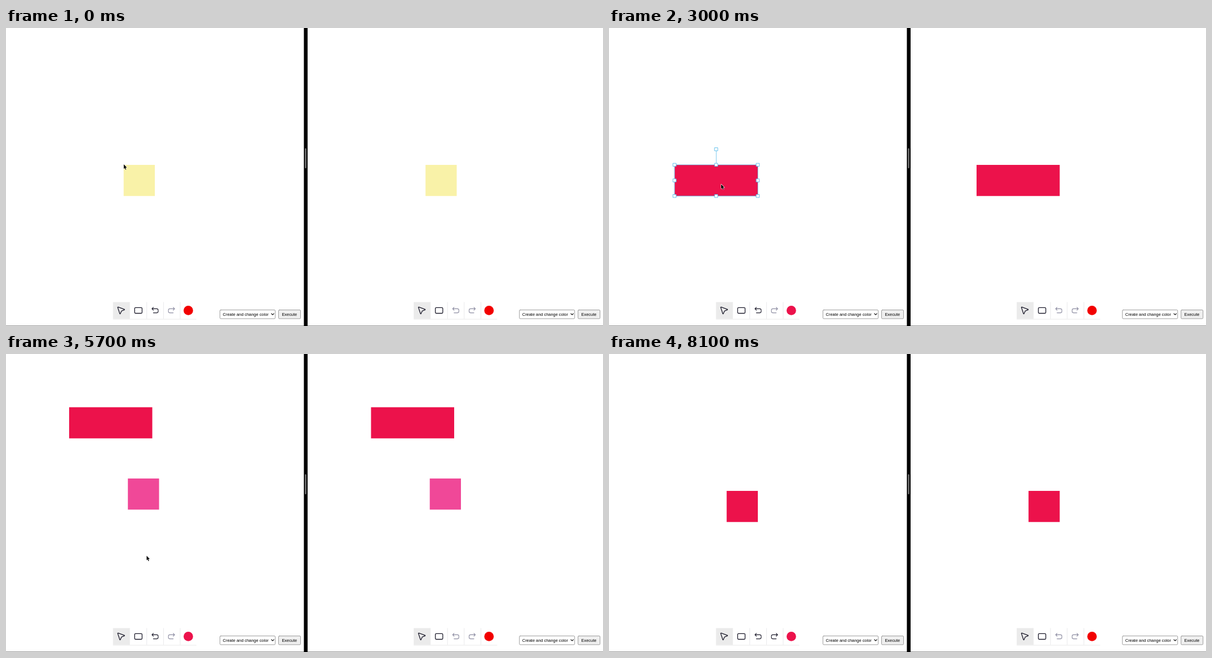
Animation of 1059x529 px, one loop 8200 ms. Source, as an HTML page with a canvas:

```html
<!DOCTYPE html>
<html lang="en">
<head>
<meta charset="utf-8">
<title>Shared whiteboard</title>
<style>
html, body { margin: 0; width: 100%; height: 100%; overflow: hidden; background: #fff; }
canvas { display: block; width: 1059px; height: 529px; }
</style>
</head>
<body>
<canvas id="stage"></canvas>
<script>
const W = 1059, H = 529, LOOP = 8200, STEP = 100;
const YELLOW = '#f9f2a8', CRIMSON = '#ec124b', PINK = '#f04898', RED = '#f20000';
const BLUE = '#45b4e8', INK = '#1c1b2b', MUTED = '#8d8da2', HOVER = '#ebebeb';
const SIDE = 55.3, CELL = 29.6, BAR_X = 189.8, BAR_Y = 486.5, PANE_SHIFT = 535.5;

const canvas = document.getElementById('stage');
const ctx = canvas.getContext('2d');
const ratio = window.devicePixelRatio || 1;
canvas.width = W * ratio;
canvas.height = H * ratio;

const point = (x, y) => ({ x, y });
const plus = (a, b) => point(a.x + b.x, a.y + b.y);
const mix = (a, b, k) => a + (b - a) * k;
const within = (t, from, to) => t >= from && t < to;
const cellCentre = i => point(BAR_X + (i + 0.5) * CELL, 496);

const square = point(208.7, 242.9), pinkSquare = point(243.4, 320.8);
const stretch = -92.2;
const moveBy = point(-4.5, -148.4), pinkMoveBy = point(-27.2, -99.8);

// Each leg eases the pointer from where it rests to a new place.
const leg = (from, to, goal) => ({ from, to, goal });
const edge = point(207, 269.5), grip = point(198.7, 277), pinkGrip = point(265, 350);
const resizeLeg = leg(2200, 2400, plus(edge, point(stretch, 0)));
const moveLeg = leg(3000, 3200, plus(grip, moveBy));
const pinkLeg = leg(5300, 5600, plus(pinkGrip, pinkMoveBy));
const legs = [
  leg(0, 300, point(230, 269)),
  leg(600, 1300, cellCentre(4)),
  leg(1600, 2200, edge),
  resizeLeg,
  leg(2600, 3000, grip),
  moveLeg,
  leg(3600, 4100, cellCentre(1)),
  leg(4300, 4700, pinkSquare),
  leg(4800, 5200, pinkGrip),
  pinkLeg,
  leg(5600, 6000, cellCentre(2)),
  leg(7900, 8000, point(346, 319))
];

function progress({ from, to }, t) {
  const k = Math.min(1, Math.max(0, (t - from) / (to - from)));
  return 1 - (1 - k) ** 2;
}

function pointerAt(t) {
  return legs.reduce((p, l) => {
    const k = progress(l, t);
    return point(mix(p.x, l.goal.x, k), mix(p.y, l.goal.y, k));
  }, point(208.6, 241.6));
}

function sceneAt(t) {
  const stretched = t < 7300 ? stretch * progress(resizeLeg, t) : 0;
  const moved = t < 6700 ? progress(moveLeg, t) : 0;
  const shapes = [{
    x: square.x + stretched + moveBy.x * moved, y: square.y + moveBy.y * moved,
    w: SIDE - stretched, color: t < 1500 ? YELLOW : CRIMSON
  }];
  if (within(t, 4700, 6600)) {
    const k = t < 6300 ? progress(pinkLeg, t) : 0;
    shapes.push({ x: pinkSquare.x + pinkMoveBy.x * k, y: pinkSquare.y + pinkMoveBy.y * k, w: SIDE, color: PINK });
  }
  return {
    shapes,
    selected: within(t, 600, 4300),
    brush: t < 1500 ? RED : CRIMSON,
    tool: within(t, 4300, 4700) ? 1 : 0,
    hover: within(t, 4100, 4400) ? 1 : within(t, 6000, 8000) ? 2 : -1,
    canUndo: true,
    canRedo: t >= 6300
  };
}

function stroke(color, width, draw) {
  ctx.beginPath();
  draw();
  ctx.strokeStyle = color;
  ctx.lineWidth = width;
  ctx.stroke();
}

function fill(color, draw) {
  ctx.beginPath();
  draw();
  ctx.fillStyle = color;
  ctx.fill();
}

const fillRect = (color, ...box) => fill(color, () => ctx.rect(...box));

function at(x, y, draw) {
  ctx.save();
  ctx.translate(x, y);
  draw();
  ctx.restore();
}

function drawHandle(x, y) {
  const box = () => ctx.rect(x - 2.7, y - 2.7, 5.4, 5.4);
  fill('#fff', box);
  stroke(BLUE, 0.8, box);
}

function drawSelection({ x, y, w }) {
  const cx = x + w / 2, top = y - SIDE / 2;
  stroke(BLUE, 0.7, () => {
    ctx.rect(x, y, w, SIDE);
    ctx.moveTo(cx, y);
    ctx.lineTo(cx, top);
  });
  for (const u of [0, 0.5, 1])
    for (const v of [0, 0.5, 1])
      if (u !== 0.5 || v !== 0.5) drawHandle(x + u * w, y + v * SIDE);
  drawHandle(cx, top);
}

function drawHistoryArrow(x, flip, color) {
  at(x, 501, () => {
    ctx.scale(flip, 1);
    stroke(color, 1.1, () => {
      ctx.moveTo(-3, -5.2);
      ctx.lineTo(-5.5, -2.6);
      ctx.lineTo(-3, 0);
      ctx.moveTo(-5.5, -2.6);
      ctx.arcTo(5.5, -2.6, 5.5, 4.6, 2.6);
      ctx.arcTo(5.5, 4.6, -3, 4.6, 2.6);
      ctx.lineTo(-3, 4.6);
    });
  });
}

function drawSelectIcon() {
  stroke(INK, 1.3, () => {
    ctx.moveTo(200, 501.5);
    ctx.arcTo(197.8, 494.9, 211.2, 499.8, 0.6);
    ctx.arcTo(211.2, 499.8, 205, 502.2, 0.5);
    ctx.arcTo(205, 502.2, 202.2, 508.4, 1.2);
    ctx.arcTo(202.2, 508.4, 200, 501.5, 0.5);
    ctx.closePath();
  });
}

function drawToolbar(shift, { tool, hover, brush, canUndo, canRedo }) {
  at(shift, 0, () => {
    fillRect('#ececec', BAR_X, BAR_Y + 30, CELL * 5, 1);
    for (const cell of [tool, hover])
      if (cell >= 0) fillRect(HOVER, BAR_X + cell * CELL, BAR_Y, CELL + 0.4, 30);
    for (let i = 2; i < 5; i++) fillRect('#e6e6e8', BAR_X + i * CELL + 0.3, BAR_Y, 0.9, 30);
    drawSelectIcon();
    stroke(INK, 1.3, () => ctx.roundRect(228.2, 496.3, 13.2, 10.2, 1.8));
    drawHistoryArrow(264.4, 1, canUndo ? INK : MUTED);
    drawHistoryArrow(293.6, -1, canRedo ? INK : MUTED);
    fill(brush, () => ctx.arc(323.4, 501.4, 8.4, 0, Math.PI * 2));
  });
}

function drawControl(x, w, color) {
  const box = () => ctx.roundRect(x, 500.5, w, 15.5, 1.5);
  fill(color, box);
  stroke('#767676', 0.7, box);
}

function drawControls(shift) {
  at(shift, 0, () => {
    drawControl(379.5, 98, '#fff');
    drawControl(483.5, 39, '#efefef');
    ctx.fillStyle = '#000';
    ctx.font = '7.41px Arial, "Liberation Sans", sans-serif';
    ctx.fillText('Create and change color', 384.6, 510.8);
    ctx.fillText('Execute', 489.4, 510.8);
    stroke('#111', 1.1, () => {
      ctx.moveTo(470.8, 507);
      ctx.lineTo(473, 509.2);
      ctx.lineTo(475.2, 507);
    });
  });
}

const doubleArrow = 'M-4.3 0l2.5-2.4v1.7h3.6v-1.7l2.5 2.4l-2.5 2.4v-1.7h-3.6v1.7z';
const pointers = {
  arrow: { path: new Path2D('M.3.4v8l1.7-1.6 1.4 3.1 1.2-.6-1.3-3 2.5-.1z'), fill: '#000', line: '#fff' },
  resize: { path: new Path2D(doubleArrow), fill: '#000', line: '#fff' },
  hand: {
    path: new Path2D('M-1.5 1v-4.8q.9-1.4 1.7 0v2.8l3.4.7q1 .3.7 1.7l-1 3.4h-4.5l-2.8-3.6q.3-1.8 2.5-.2z'),
    fill: '#fff', line: '#111'
  }
};

function drawPointer(t) {
  if (t >= 8100) return;
  const pressing = within(t, 1300, 1700) || within(t, 4100, 4400) || within(t, 6000, 8000);
  const look = pointers[within(t, 2200, 2700) ? 'resize' : pressing ? 'hand' : 'arrow'];
  const { x, y } = pointerAt(t);
  at(x, y, () => {
    ctx.strokeStyle = look.line;
    ctx.fillStyle = look.fill;
    ctx.lineWidth = 1;
    ctx.stroke(look.path);
    ctx.fill(look.path);
  });
}

function render(t) {
  const scene = sceneAt(t);
  ctx.setTransform(ratio, 0, 0, ratio, 0, 0);
  ctx.lineJoin = ctx.lineCap = 'round';
  fillRect('#fff', 0, 0, W, H);
  fillRect('#9a9a9a', 0, 528, W, 1);

  for (const { x, y, w, color } of scene.shapes)
    for (const shift of [0, PANE_SHIFT]) fillRect(color, x + shift, y, w, SIDE);
  if (scene.selected) drawSelection(scene.shapes[0]);

  drawToolbar(0, scene);
  drawToolbar(533.4, { tool: 0, hover: -1, brush: RED });
  drawControls(0);
  drawControls(531.2);

  fillRect('#000', 528.4, 0, 6.6, H);
  fill('#858585', () => ctx.roundRect(530.5, 213.5, 2.2, 35.5, 1.1));
  drawPointer(t);
}

const start = performance.now();
function tick() {
  const t = (performance.now() - start) % LOOP;
  render(Math.floor(t / STEP) * STEP);
  requestAnimationFrame(tick);
}
tick();
</script>
</body>
</html>
```
